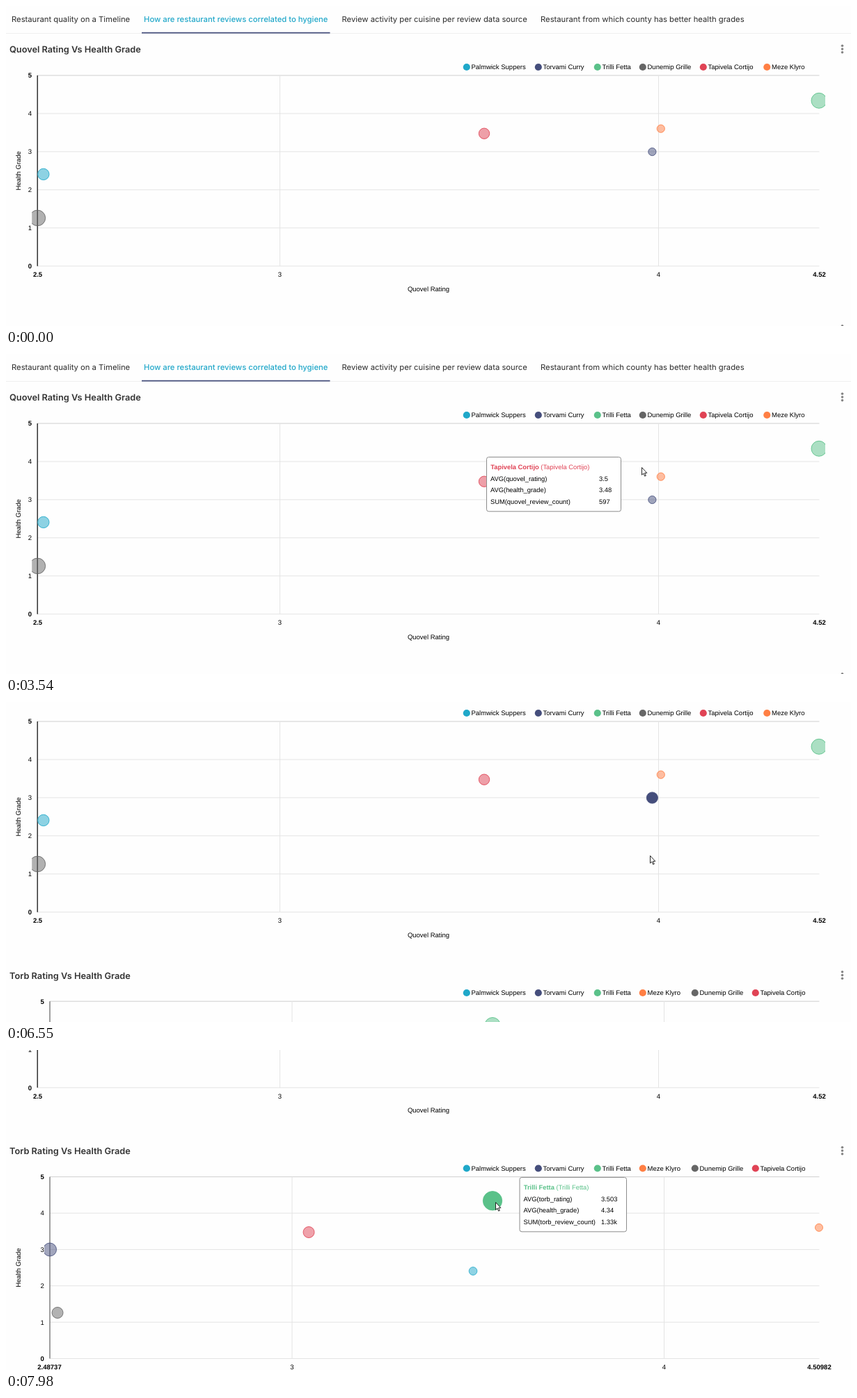
Write an HTML page that moves like this. It is 1214 px wide and 461 px high and loops after 8000 ms.

```html
<!DOCTYPE html>
<html lang="en">
<head>
<meta charset="utf-8">
<title>Rating dashboard</title>
<style>
  html, body { margin: 0; width: 100%; height: 100%; overflow: hidden; background: #fefefe; }
  svg { display: block; width: 100%; height: 100%; text-rendering: geometricPrecision; }
  text { font: 9.5px "Liberation Sans", Arial, sans-serif; fill: #000; }
  .b { font-weight: 700; }
  .m { text-anchor: middle; }
  .e { text-anchor: end; }
  .tab { font: 11.25px Inter, sans-serif; fill: #2b2b2b; }
  .on { font-weight: 500; fill: #20a7c9; }
  .title { font: 600 12.75px Inter, sans-serif; fill: #333; }
  .tip text { font-size: 9.35px; }
  .grid { stroke: #e4e4e4; }
  .top { stroke: #cfcfcf; }
</style>
</head>
<body>
<svg id="stage" viewBox="0 0 1214 461" xmlns="http://www.w3.org/2000/svg"></svg>
<script>
const LOOP = 8000;
const stage = document.getElementById('stage');

const places = {
  carib: ['Palmwick Suppers', '#1fa8c9'],
  india: ['Torvami Curry', '#454e7c'],
  italy: ['Trilli Fetta', '#5ac189'],
  malibu: ['Dunemip Grille', '#666666'],
  spain: ['Tapivela Cortijo', '#e04355'],
  greek: ['Meze Klyro', '#ff7f44']
};

const text = (x, y, s, cls = '') => `<text x="${x}" y="${y}" class="${cls}">${s}</text>`;
const line = (x1, y1, x2, y2, cls) =>
  `<line x1="${x1}" y1="${y1}" x2="${x2}" y2="${y2}" class="${cls}"/>`;
const dot = (x, y, r, fill) => `<circle cx="${x}" cy="${y}" r="${r}" fill="${fill}"/>`;

// legend: [place, x]; bubbles: [place, x, y, r]; ticks: [x, label]
const charts = [
  {
    id: 'a', title: 'Quovel Rating Vs Health Grade', titleY: 67, menuY: 62, legendY: 88,
    left: 45.2, top: 100, bottom: 374.7, axis: '#222', xLabel: 'Quovel Rating',
    ticks: [[45.5, '2.5'], [393.5, '3'], [937.5, '4'], [1168.5, '4.52']],
    legend: [['carib', 662], ['india', 765], ['italy', 850], ['malibu', 915], ['spain', 1002], ['greek', 1093.5]],
    bubbles: [['carib', 53.8, 242.4, 8.2], ['malibu', 45.3, 305.4, 11.3], ['italy', 1168, 136.3, 11],
      ['spain', 687, 183.7, 7.7], ['greek', 940.8, 176.7, 5.6], ['india', 928.4, 210, 5.6]]
  },
  {
    id: 'b', title: 'Torb Rating Vs Health Grade', titleY: 470.5, menuY: 465.5, legendY: 491,
    left: 63, top: 503.2, bottom: 765, axis: '#777', xLabel: 'Torb Rating',
    ticks: [[62.5, '2.48737'], [411, '3'], [945.5, '4'], [1168.5, '4.50982']],
    legend: [['carib', 662], ['india', 765], ['italy', 850], ['greek', 915], ['malibu', 990], ['spain', 1077]],
    bubbles: [['india', 63, 608, 9.5], ['malibu', 74, 699, 8], ['spain', 435, 583, 8],
      ['italy', 699, 537.7, 11.2], ['carib', 671, 639, 5.8], ['greek', 1168, 576.3, 5.5]]
  }
];

function chart(c) {
  const last = c.ticks.length - 1;
  const midY = (c.top + c.bottom) / 2;
  let s = text(5, c.titleY, c.title, 'title');
  for (const d of [-4.7, 0, 4.7]) s += dot(1201.5, c.menuY + d, 1.8, '#858585');

  for (const [key, x] of c.legend) {
    const [name, color] = places[key];
    s += dot(x - .2, c.legendY, 5.1, color) + text(x + 6.5, c.legendY + 3.3, name);
  }
  for (let i = 0; i <= 5; i++) {
    const y = c.bottom + (c.top - c.bottom) * i / 5;
    s += line(c.left, y, 1168.5, y, i === 5 ? 'top' : 'grid');
    s += text(c.left - 8.2, y + 3.4, i, i % 5 ? 'e' : 'e b');
  }
  c.ticks.forEach(([x, label], i) => {
    const end = i === 0 || i === last;
    if (!end) s += line(x, c.top, x, c.bottom, 'grid');
    s += text(x, c.bottom + 15.3, label, end ? 'm b' : 'm');
  });
  s += `<path d="M${c.left} ${c.top}V${c.bottom}" stroke="${c.axis}" stroke-width="1.4"/>`;
  s += text(607, c.bottom + 36, c.xLabel, 'm');
  s += `<text class="m" transform="translate(21 ${midY}) rotate(-90)">Health Grade</text>`;

  const clipX = c.left - 8;
  s += `<clipPath id="clip-${c.id}"><rect x="${clipX}" y="${c.top - 20}" width="${1177 - clipX}" height="${c.bottom - c.top + 40}"/></clipPath>`;
  s += `<g clip-path="url(#clip-${c.id})">`;
  for (const [key, x, y, r] of c.bubbles) {
    const color = places[key][1];
    s += `<circle id="${c.id}-${key}" cx="${x}" cy="${y}" r="${r}" fill="${color}" fill-opacity=".5" stroke="${color}" stroke-opacity=".85"/>`;
  }
  return s + '</g>';
}

// valueX is the offset of the value column
const tips = [
  { key: 'spain', x: 690.5, y: 148.5, w: 193, valueX: 161.5, site: 'quovel', values: ['3.5', '3.48', '597'], from: 2315, to: 3672 },
  { key: 'greek', x: 944.5, y: 133, w: 160.5, valueX: 128.5, site: 'quovel', values: ['4.01', '3.6', '312'], from: 3804, to: 5482 },
  { key: 'india', x: 956.5, y: 157.5, w: 180, valueX: 148, site: 'quovel', values: ['3.98', '3', '296'], from: 5482, to: 6550 },
  { key: 'italy', x: 738, y: 183.5, w: 153.5, valueX: 117, site: 'torb', values: ['3.503', '4.34', '1.33k'], from: 7910, to: LOOP }
];

function tip(t) {
  const [name, color] = places[t.key];
  const rows = [`AVG(${t.site}_rating)`, 'AVG(health_grade)', `SUM(${t.site}_review_count)`];
  let s = `<g class="tip" id="tip-${t.key}" transform="translate(${t.x} ${t.y})">`;
  s += `<rect width="${t.w}" height="78.3" rx="3" fill="#fff" stroke="#8c8c8c"/>`;
  s += `<text x="5.8" y="17.4" style="fill:${color}"><tspan class="b">${name}</tspan> (${name})</text>`;
  rows.forEach((row, i) => {
    const y = 34.2 + 16.7 * i;
    s += text(5.5, y, row) + text(t.valueX, y, t.values[i]);
  });
  return s + '</g>';
}

const tabs = [
  [8, 'Restaurant quality on a Timeline'],
  [198, 'How are restaurant reviews correlated to hygiene'],
  [482.5, 'Review activity per cuisine per review data source'],
  [768, 'Restaurant from which county has better health grades']
];

stage.innerHTML =
  '<g id="page">' +
  tabs.map(([x, s], i) => text(x, 23.4, s, i === 1 ? 'tab on' : 'tab')).join('') +
  '<path d="M0 39.5H1214" stroke="#f0f0f0"/>' +
  '<path d="M195 38.6H465.5" stroke="#454e7c" stroke-width="1.6"/>' +
  charts.map(chart).join('') + '</g>' +
  tips.map(tip).join('') +
  '<path id="cursor" d="M.5 .5V11.2L2.9 9L4.6 13L6.3 12.3L4.6 8.4H7.8Z" fill="#fff" stroke="#111" stroke-width=".9" stroke-linejoin="round"/>';

const $ = id => document.getElementById(id);
const page = $('page'), cursor = $('cursor');

// [start, last step, steps, points spread evenly over the steps]
const moves = [
  [920, 1390, 8, [[739, 451], [590, 441], [470, 430], [395, 422], [369, 419]]],
  [1790, 2390, 9, [[391, 385], [475, 305], [600, 225], [678, 188], [685, 185]]],
  [3210, 3870, 11, [[694, 184], [785, 170], [913, 163], [938, 174], [940, 179]]],
  [5280, 5550, 5, [[941, 186], [938, 200], [932, 212], [927, 219], [925, 221]]],
  [7420, 7980, 9, [[918, 222], [850, 226], [755, 224], [708, 220], [703, 219]]]
];
const scroll = [6550, 6890, 6, [[72], [165], [245], [300], [320.5], [320.5]]];

const hovers = [
  ['a-spain', 2240, 3342],
  ['a-greek', 3672, 5415],
  ['a-india', 5415, LOOP],
  ['b-italy', 7840, LOOP]
].map(([id, from, to]) => ({ el: $(id), r: +$(id).getAttribute('r'), from, to }));

function along([start, end, steps, pts], t) {
  const n = steps - 1;
  const k = Math.min(n, Math.floor((t - start) / (end - start) * n + 1e-6));
  const u = k / n * (pts.length - 1);
  const i = Math.min(pts.length - 2, Math.floor(u));
  return pts[i].map((v, j) => v + (pts[i + 1][j] - v) * (u - i));
}

function draw(t) {
  const inside = o => t >= o.from && t < o.to;
  const offset = t < scroll[0] ? 0 : along(scroll, t)[0];
  page.setAttribute('transform', `translate(0 ${-offset})`);

  const move = moves.filter(m => t >= m[0]).pop();
  cursor.style.display = move ? '' : 'none';
  if (move) cursor.setAttribute('transform', `translate(${along(move, t)})`);

  for (const h of hovers) {
    const on = inside(h);
    h.el.setAttribute('r', on ? h.r + 2.5 : h.r);
    h.el.setAttribute('fill-opacity', on ? 1 : .5);
  }
  for (const o of tips) $('tip-' + o.key).style.display = inside(o) ? '' : 'none';
}

const began = performance.now();
function tick() {
  draw((performance.now() - began) % LOOP);
  requestAnimationFrame(tick);
}
tick();
</script>
</body>
</html>
```
